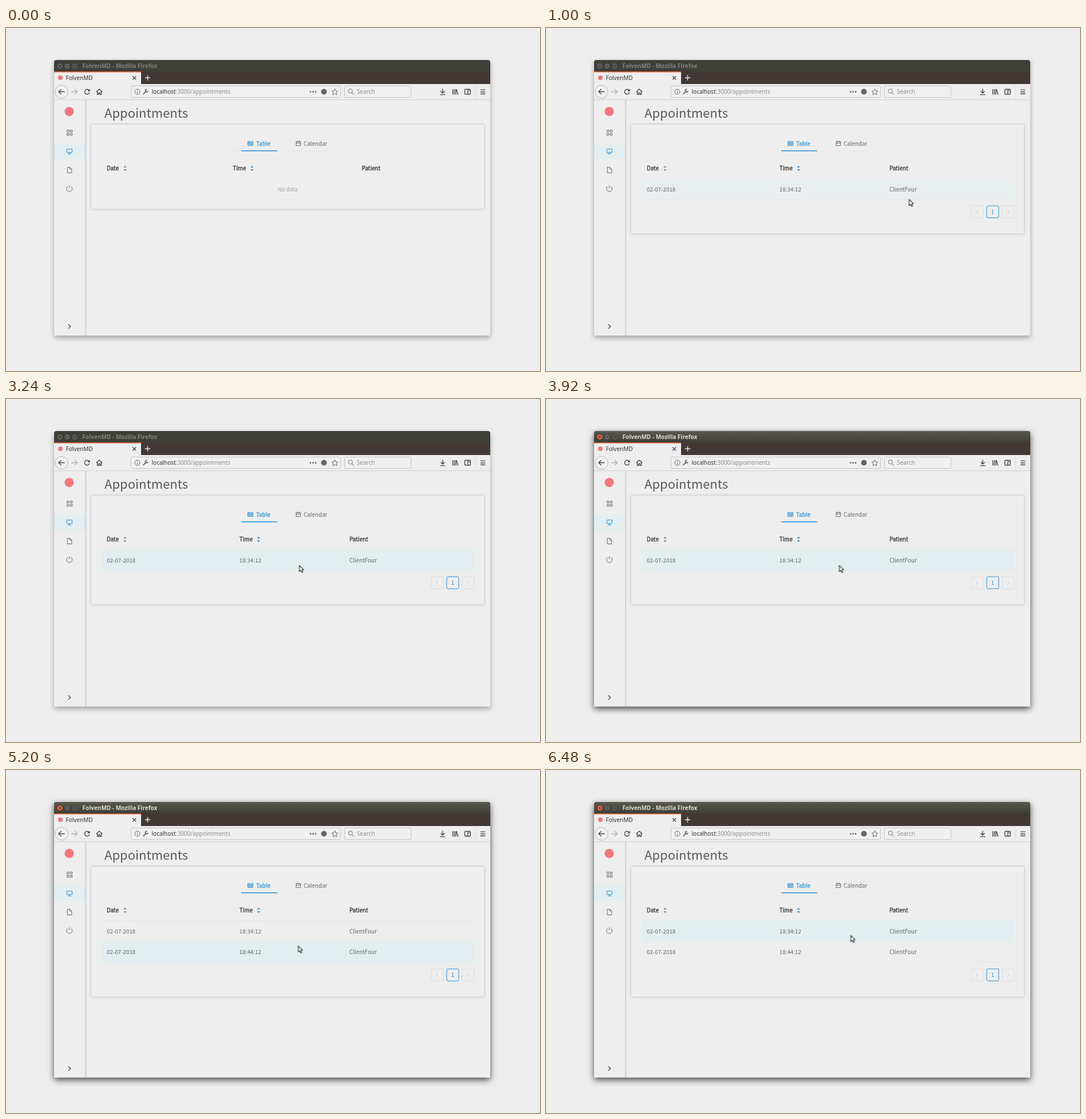
An HTML page that plays this animation: 933x600 px, repeating every 6.56 s.

```html
<!DOCTYPE html>
<html lang="en">
<head>
<meta charset="utf-8">
<title>Appointments</title>
<style>
  html, body { margin: 0; width: 100%; height: 100%; overflow: hidden; background: #eee; }
  svg { display: block; width: 933px; height: 600px; }
  .ui { font: 10px "Noto Sans", "Open Sans", sans-serif; fill: #444; }
  .title { font-weight: 700; fill: #dfdbd2; }
  .dim { fill: #85827b; }
  .page { font: 9.8px "Noto Sans CJK SC", "Noto Sans CJK JP", "Noto Sans", sans-serif; fill: #666; }
  .head { font-weight: 500; fill: #333; stroke: #333; stroke-width: .3; }
  .line { fill: none; stroke: #666; stroke-width: 1; }
  .tool { fill: none; stroke: #484848; stroke-width: 1.4; }
  .rule { stroke: #e7e7e7; }
  .panel { fill: #eee; filter: drop-shadow(0 0 2px #aeaec2); }
  .hover { fill: #e3eef0; opacity: 0; }
  .blue { stroke: #2b8fd3; }
  .idle { filter: drop-shadow(0 4px 4px rgba(0,0,0,.32)); }
  .active { filter: drop-shadow(0 4px 6px rgba(0,0,0,.7)); }
  .mid { text-anchor: middle; }
</style>
</head>
<body>
<svg viewBox="0 0 933 600">
  <defs>
    <linearGradient id="bar" x2="0" y2="1">
      <stop stop-color="#5a594f"/><stop offset="1" stop-color="#3d3c37"/>
    </linearGradient>
    <linearGradient id="edge">
      <stop stop-color="#c9cad6"/><stop offset="1" stop-color="#e8e8ec"/>
    </linearGradient>
    <path id="frame" d="M84 538V60q0-4 4-4H842q4 0 4 4V538z"/>
    <path id="sort" d="M-2.7-1.4L0-4.8 2.7-1.4zM-2.7 1.4L0 4.8 2.7 1.4z"/>
    <g id="pager">
      <g fill="none" stroke="#dcdcdc">
        <rect x="743" y="311" width="21" height="21" rx="2"/>
        <rect x="797" y="311" width="21" height="21" rx="2"/>
        <path stroke="#c8c8c8" d="M755 319l-3 3 3 3M806 319l3 3-3 3"/>
        <rect class="blue" x="770" y="311" width="21" height="21" rx="2"/>
      </g>
      <text class="page mid" x="780.5" y="325.4" style="fill:#2b8fd3">1</text>
    </g>
  </defs>

  <!-- window -->
  <use href="#frame" class="idle" fill="#eee" data-show="0 3280"/>
  <use href="#frame" class="active" fill="#eee" data-show="3280 6560"/>
  <path d="M84 78V60q0-4 4-4H842q4 0 4 4V78z" fill="#3f3f3a"/>
  <path d="M84 77V60q0-4 4-4H842q4 0 4 4V77z" fill="url(#bar)" data-show="3280 6560"/>
  <path d="M84 77H846V98H84z" fill="#423936"/>
  <path d="M84 77H236V98H84z" fill="#eee"/>
  <path d="M84 76H236V77.6H84z" fill="#df6231"/>
  <g stroke="#33322e" stroke-width=".8" fill="#65645e">
    <circle cx="94" cy="66.5" r="5"/><circle cx="107" cy="66.5" r="5"/><circle cx="120" cy="66.5" r="5"/>
    <circle cx="94" cy="66.5" r="5" fill="#ea6b40" data-show="3280 6560"/>
    <path fill="none" stroke-width="1.1" d="M92.2 64.7l3.6 3.6m0-3.6l-3.6 3.6M104.7 66.5h4.6M118 64.7h4v3.6h-4z"/>
  </g>
  <text class="ui title dim" x="133.5" y="70" data-show="0 3280">FolvenMD - Mozilla Firefox</text>
  <text class="ui title" x="133.5" y="70" data-show="3280 6560">FolvenMD - Mozilla Firefox</text>
  <circle cx="95" cy="87" r="4" fill="#f2777f"/>
  <text class="ui" x="104.5" y="90.6" style="fill:#333">FolvenMD</text>
  <path class="tool" d="M221.2 84.2l6 6m0-6l-6 6"/>
  <path class="tool" style="stroke:#e8e4e0" d="M242.8 87h9.4M247.5 82.3v9.4"/>

  <!-- toolbar -->
  <path d="M84 125.5H846" stroke="#cfcfcf"/>
  <circle cx="97" cy="111.5" r="11.3" fill="#f1f1f1" stroke="#b4b4b4"/>
  <g class="tool">
    <path d="M92 111.5h10.5M96.6 107l-4.6 4.5 4.6 4.5"/>
    <path stroke="#b2b2b2" d="M114 111.5h10.5M120 107l4.6 4.5-4.6 4.5"/>
    <path d="M145 109a4.2 4.2 0 1 0 .7 3.6"/>
    <path fill="#484848" stroke="none" d="M146.6 106.4v4.4h-4.4z"/>
    <path d="M157.8 111.8l5.2-4.8 5.2 4.8M159.6 111v5.4h2.3v-3h2.3v3h2.3V111"/>
  </g>
  <g fill="#f0f0f0" stroke="#c6c6c6">
    <rect x="218.5" y="101.5" width="366" height="20" rx="2"/>
    <rect x="591.5" y="101.5" width="116" height="20" rx="2"/>
  </g>
  <circle class="line" cx="229.5" cy="111.5" r="4.5"/>
  <path class="line" d="M229.5 111v3.2M229.5 108.6v1.1"/>
  <g class="tool" style="stroke:#707070;stroke-width:2">
    <path stroke-linecap="round" d="M240 115.4l4.3-4.3"/>
    <path d="M246.4 107.6a2.2 2.2 0 1 0 1.4 2.2"/>
  </g>
  <text class="ui" x="254.5" y="115.2" style="fill:#8d8d8d"><tspan fill="#333">localhost</tspan>:3000/appointments</text>
  <g fill="#666">
    <circle cx="532" cy="111.7" r="1.4"/><circle cx="536.5" cy="111.7" r="1.4"/><circle cx="541" cy="111.7" r="1.4"/>
    <circle cx="555.5" cy="111.5" r="5"/>
  </g>
  <path class="line" stroke-linejoin="round" d="M574.5 106.4l1.6 3.4 3.7.5-2.7 2.6.7 3.7-3.3-1.8-3.3 1.8.7-3.7-2.7-2.6 3.7-.5z"/>
  <g class="tool" style="stroke:#909090;stroke-width:1.2">
    <circle cx="601.8" cy="110.2" r="3.4"/><path d="M604.3 112.8l3.7 3.8"/>
  </g>
  <text class="ui" x="613" y="115.2" style="fill:#8d8d8d">Search</text>
  <g class="tool">
    <path d="M763 106.5v7.2M759.5 110.6l3.5 3.5 3.5-3.5M758.6 116.6h8.8"/>
    <path d="M780.6 107v9.5M783.4 107v9.5M786 107v9.5M787 107.2l2.8 9.3"/>
    <rect x="801.6" y="107.2" width="9.8" height="8.6" rx="1.4"/><path d="M807 107v9M808.4 109.6h2"/>
    <path d="M829 108.1h8.4M829 111.7h8.4M829 115.3h8.4"/>
  </g>
  <path d="M820.5 99V124" stroke="#ddd"/>

  <!-- sidebar -->
  <path d="M84 202.5h54v27H84z" fill="#e3eef0"/>
  <path d="M138 126h3v412h-3z" fill="url(#edge)"/>
  <circle cx="110.5" cy="146" r="8" fill="#f2777f"/>
  <g class="line">
    <path d="M106.5 178.5h3.4v3.4h-3.4zM112.3 178.5h3.4v3.4h-3.4zM106.5 184.3h3.4v3.4h-3.4zM112.3 184.3h3.4v3.4h-3.4z"/>
    <path class="blue" d="M106.3 211.8h9.2v6h-9.2zM110.9 218v2M108 220.2h5.8"/>
    <path d="M107.2 243.5h4.6l3 3v7h-7.6zM111.6 243.7v3.1h3"/>
    <path d="M108 276.8a5 5 0 1 0 5.4 0M110.7 275.3v5"/>
    <path style="stroke:#444;stroke-width:1.2" d="M108.8 518.5l4 3.7-4 3.7"/>
  </g>

  <!-- page -->
  <text class="page" x="172" y="157" style="font-size:22px;fill:#5a5a5a">Appointments</text>
  <rect class="panel" x="149" y="169" width="686" height="147.5" data-show="0 680"/>
  <rect class="panel" x="149" y="169" width="686" height="190.5" data-show="680 4120"/>
  <rect class="panel" x="149" y="169" width="686" height="227.5" data-show="4120 6560"/>

  <path class="rule" d="M168 215.5H818M168 263.5H818M168 300.5H818"/>
  <path class="rule" d="M168 336.5H818" data-show="4120 6560"/>
  <rect class="hover" id="hover1" x="167" y="264" width="651.5" height="36.5"/>
  <rect class="hover" id="hover2" x="167" y="300.5" width="651.5" height="36.5"/>

  <path class="blue" stroke-width="1.5" d="M411 214.8H473.5"/>
  <path class="line blue" d="M422.5 198.5h9v7h-9zM422.5 200.6h9M422.5 203h9M425.4 200v5.5M428.5 200v5.5"/>
  <path class="line" d="M507 198.7h7.6v7H507zM507 201.3h7.6M509 197.2v2.4M512.6 197.2v2.4"/>
  <g class="page">
    <text x="437" y="205.6" style="fill:#2b8fd3;stroke:#2b8fd3;stroke-width:.25">Table</text>
    <text x="520" y="205.6">Calendar</text>
    <text class="head" x="176" y="249">Date</text>
    <use href="#sort" x="208" y="245.5" fill="#888"/>

    <g data-show="0 680">
      <text class="head" x="396.3" y="249">Time</text>
      <use href="#sort" x="430" y="245.5" fill="#4a90c4"/>
      <text class="head" x="621.7" y="249">Patient</text>
      <text class="mid" x="492" y="285.8" style="fill:#a2a2a2;font-size:9.5px">No data</text>
    </g>
    <g data-show="680 6560">
      <text class="head" x="407.8" y="249">Time</text>
      <use href="#sort" x="441.3" y="245.5" fill="#4a90c4"/>
      <text class="head" x="600" y="249">Patient</text>
      <text x="176" y="285.8">02-07-2018</text>
      <text x="407.8" y="285.8">18:34:12</text>
      <text x="600" y="285.8">ClientFour</text>
    </g>
    <g data-show="4120 6560">
      <text x="176" y="322.4">02-07-2018</text>
      <text x="407.8" y="322.4">18:44:12</text>
      <text x="600" y="322.4">ClientFour</text>
    </g>
  </g>
  <use href="#pager" data-show="680 4120"/>
  <use href="#pager" y="37" data-show="4120 6560"/>

  <g data-show="40 6560">
    <path id="cursor" d="M0 0V10.6L2.5 8.4 4.2 12.2 6.1 11.4 4.5 7.7 7.7 7.4z" fill="#f4f4f4" stroke="#2c2c2c" stroke-width="1.1" stroke-linejoin="round"/>
  </g>
</svg>
<script>
const LOOP = 6560;
const $ = id => document.getElementById(id);

const play = (el, steps, easing = "linear") => el.animate(
  steps.map(([t, style]) => ({ offset: t / LOOP, easing, ...style })),
  { duration: LOOP, iterations: Infinity });

const fade = (el, steps, easing) =>
  play(el, steps.map(([t, opacity]) => [t, { opacity }]), easing);

// Each data-show holds the start and end of visibility in ms.
for (const el of document.querySelectorAll("[data-show]")) {
  const [from, to] = el.dataset.show.split(" ").map(Number);
  const steps = [[from, 1], [to, 0]];
  if (from > 0) steps.unshift([0, 0]);
  if (to < LOOP) steps.push([LOOP, 0]);
  fade(el, steps, "step-end");
}

fade($("hover1"), [[0, 0], [860, 0], [1000, .5], [1180, .25], [1480, 1], [4360, 1], [4640, 0], [5420, 0], [5720, 1], [LOOP, 1]]);
fade($("hover2"), [[0, 0], [4360, 0], [4640, 1], [5420, 1], [5720, 0], [LOOP, 0]]);

// Pointer path: time, x, y
play($("cursor"), [
  [0, 852, 508], [40, 852, 508], [240, 841, 412], [440, 815, 298], [600, 800, 246], [640, 799.5, 244.3],
  [720, 790, 246], [960, 660, 299], [1140, 548, 303], [1320, 510.5, 289],
  [2120, 510.5, 289], [2160, 512.5, 291.3],
  [4240, 512.5, 291.3], [4520, 510.5, 307.8],
  [5200, 510.5, 307.8], [5400, 518, 302], [5680, 532.5, 289.5], [LOOP, 532.5, 289.5]
].map(([t, x, y]) => [t, { transform: `translate(${x}px, ${y}px)` }]));
</script>
</body>
</html>
```
